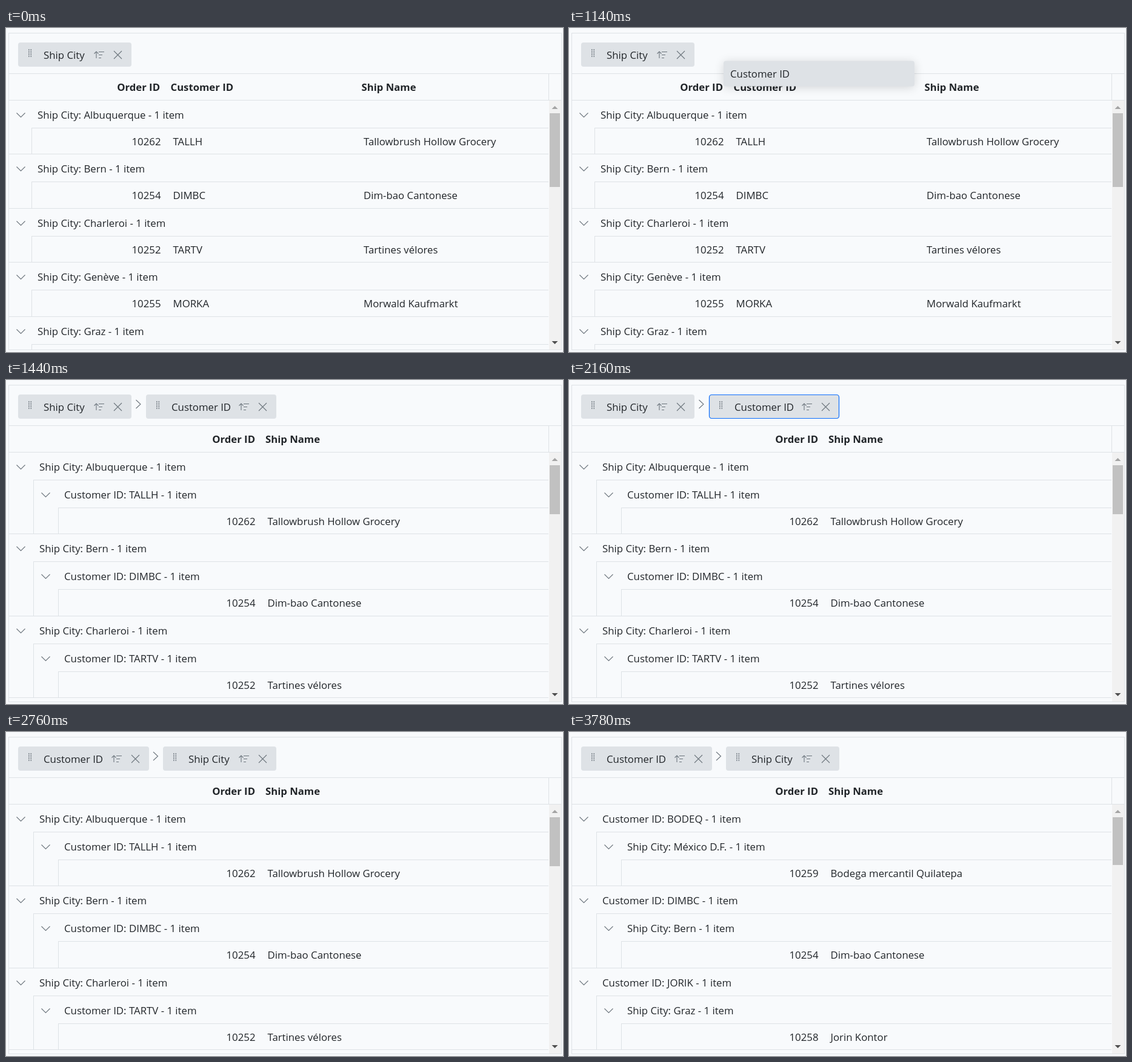
Recreate the animation shown at these times as an HTML page with a canvas. Size 919 by 536 pixels, loop 4200 ms.

```html
<!DOCTYPE html>
<html lang="en">
<head>
<meta charset="utf-8">
<title>Grid grouping</title>
<style>
  html, body { margin: 0; width: 100%; height: 100%; overflow: hidden; background: #f8fafc; }
  canvas { display: block; }
</style>
</head>
<body>
<canvas id="stage" width="919" height="536"></canvas>
<script>
const ctx = document.getElementById('stage').getContext('2d');
const LOOP = 4200, STEP = 60;
const BG = '#f8fafc', LINE = '#dee2e6', CHIP = '#dee2e6', INK = '#212529', ICON = '#6c757d', BLUE = '#0d6efd';
const FACE = '"Open Sans", "Noto Sans", sans-serif';

const order = (id, code, name, city) => ({ id, code, name, city });
const tallow = order('10262', 'TALLH', 'Tallowbrush Hollow Grocery', 'Albuquerque');
const dim = order('10254', 'DIMBC', 'Dim-bao Cantonese', 'Bern');
const tartine = order('10252', 'TARTV', 'Tartines vélores', 'Charleroi');
const morwald = order('10255', 'MORKA', 'Morwald Kaufmarkt', 'Genève');
const jorin = order('10258', 'JORIK', 'Jorin Kontor', 'Graz');
const bodega = order('10259', 'BODEQ', 'Bodega mercantil Quilatepa', 'México D.F.');

const cityLabel = o => `Ship City: ${o.city} - 1 item`;
const codeLabel = o => `Customer ID: ${o.code} - 1 item`;
const ease = p => p * p * (3 - 2 * p);

function text(str, x, y, { align = 'left', bold = false } = {}) {
  ctx.font = `${bold ? '700 16.7' : '400 16.8'}px ${FACE}`;
  ctx.textAlign = align;
  ctx.fillStyle = INK;
  ctx.fillText(str, x, y);
}

function fill(x, y, w, h, color) {
  ctx.fillStyle = color;
  ctx.fillRect(x, y, w, h);
}

const hLine = (x, y, x2 = 895) => fill(x, y, x2 - x, 1, LINE);
const vLine = (x, y, y2) => fill(x, y, 1, y2 - y, LINE);

function stroke(points, color = ICON, width = 1.1) {
  ctx.beginPath();
  points.forEach(([x, y]) => ctx.lineTo(x, y));
  ctx.strokeStyle = color;
  ctx.lineWidth = width;
  ctx.stroke();
}

function roundBox(x, y, w, h, color) {
  ctx.beginPath();
  ctx.roundRect(x, y, w, h, 4);
  ctx.fillStyle = color;
  ctx.fill();
}

const chevronDown = (x, y) => stroke([[x - 7, y - 3.5], [x, y + 3.5], [x + 7, y - 3.5]]);

function triangle(x, y, dir, color) {
  ctx.beginPath();
  ctx.moveTo(x - 5, y + 2.5 * dir);
  ctx.lineTo(x + 5, y + 2.5 * dir);
  ctx.lineTo(x, y - 2.5 * dir);
  ctx.fillStyle = color;
  ctx.fill();
}

function chip(label, x, right, focused) {
  roundBox(x, 24, right - x, 40, CHIP);
  if (focused) {
    ctx.beginPath();
    ctx.roundRect(x + 0.5, 24.5, right - x - 1, 39, 4);
    ctx.strokeStyle = BLUE;
    ctx.lineWidth = 1.2;
    ctx.stroke();
  }
  for (let i = 0; i < 10; i++) fill(x + 17 + (i % 2) * 3.5, 35 + (i >> 1) * 2.8, 1.6, 1.6, ICON);
  text(label, x + 42, 50.5);

  const s = right - 62;
  stroke([[s + 4, 50], [s + 4, 39]]);
  stroke([[s + 0.5, 42.5], [s + 4, 39], [s + 7.5, 42.5]]);
  [9, 6, 4].forEach((w, i) => fill(s + 8, 39 + i * 5, w, 1, ICON));

  const c = right - 22.5;
  stroke([[c - 6.5, 38], [c + 6.5, 51]]);
  stroke([[c + 6.5, 38], [c - 6.5, 51]]);
}

const chipArrow = x => stroke([[x, 33], [x + 7.5, 40], [x, 47]]);

function dragBox(label, x, y, w, h, pad) {
  ctx.save();
  ctx.shadowColor = 'rgba(0,0,0,0.15)';
  ctx.shadowBlur = 16;
  ctx.shadowOffsetY = 2;
  roundBox(x, y, w, h, CHIP);
  ctx.restore();
  text(label, x + pad, y + h / 2 + 6);
}

function frame() {
  fill(0, 0, 919, 536, BG);
  hLine(4, 8, 917);
  hLine(4, 532, 917);
  vLine(4, 8, 533);
  vLine(916, 8, 533);
  hLine(5, 75, 916);
  hLine(5, 119, 916);
  vLine(895, 76, 119);
}

function scrollbar(thumb, color) {
  fill(896, 120, 20, 412, '#f1f1f1');
  fill(897, 141, 17, thumb, color);
  triangle(905.5, 131.5, 1, '#a3a3a3');
  triangle(905.5, 520.5, -1, '#505050');
}

function clipped(draw) {
  ctx.save();
  ctx.beginPath();
  ctx.rect(4, 120, 891, 412);
  ctx.clip();
  draw();
  ctx.restore();
}

function oneLevel() {
  text('Order ID', 254, 104, { align: 'right', bold: true });
  text('Customer ID', 271.5, 104, { bold: true });
  text('Ship Name', 586.5, 104, { bold: true });
  clipped(() => [tallow, dim, tartine, morwald, jorin].forEach((o, i) => {
    const y = Math.floor(119 + i * 89.5), end = Math.floor(119 + (i + 1) * 89.5);
    chevronDown(24.5, y + 25);
    text(cityLabel(o), 52, y + 31);
    hLine(42, y + 46);
    vLine(42, y + 46, end);
    text(o.id, 255.5, y + 75, { align: 'right' });
    text(o.code, 275.5, y + 75);
    text(o.name, 590, y + 75);
    hLine(5, end);
  }));
}

function twoLevels(rows, outer, inner) {
  text('Order ID', 411, 104, { align: 'right', bold: true });
  text('Ship Name', 428, 104, { bold: true });
  clipped(() => rows.forEach((o, i) => {
    const y = Math.floor(119 + i * 135.6), end = Math.floor(119 + (i + 1) * 135.6);
    chevronDown(24.5, y + 25);
    text(outer(o), 55, y + 31);
    hLine(45, y + 46);
    vLine(45, y + 46, end);
    chevronDown(65.5, y + 71);
    text(inner(o), 96, y + 77);
    hLine(86, y + 92);
    vLine(86, y + 92, end);
    text(o.id, 411.5, y + 121, { align: 'right' });
    text(o.name, 431.5, y + 121);
    hLine(5, end);
  }));
}

function spinner(t) {
  const turn = (t - 1380) / 1000 * Math.PI * 4;
  ctx.beginPath();
  ctx.arc(461, 270, 20.3, -1.65 + turn, 3.2 + turn);
  ctx.strokeStyle = BLUE;
  ctx.lineWidth = 4.6;
  ctx.stroke();
}

function chips(t) {
  if (t < 2460) {
    chip('Ship City', 20, 207);
    if (t < 1320) return;
    chipArrow(214.5);
    chip('Customer ID', 231, 446, t >= 2160);
  } else {
    chip('Customer ID', 20, 236);
    chipArrow(243);
    chip('Ship City', 259, 446);
  }
}

function draw(t) {
  frame();
  chips(t);

  if (t < 1440) oneLevel();
  else if (t < 2940) twoLevels([tallow, dim, tartine], cityLabel, codeLabel);
  else twoLevels([bodega, dim, jorin], codeLabel, cityLabel);

  const hover = t >= 3720 && t < 3780;
  scrollbar(t < 1440 ? 122 : t < 2940 ? 81 : 79, hover ? '#a8a8a8' : '#c1c1c1');

  if (t >= 1020 && t < 1320) {
    const e = ease((t - 1020) / 240);
    dragBox('Customer ID', 265 - 20 * e, 73 - 37 * e, 315, 42, 11);
  }
  if (t >= 1320 && t < 1440) spinner(t);
  if (t >= 2340 && t < 2760) {
    const e = ease((t - 2340) / 360);
    dragBox('Customer ID', 228 - 156 * e, 23.5, 219, 44, 9);
  }
}

const start = performance.now();
function tick() {
  const t = (performance.now() - start) % LOOP;
  draw(Math.floor(t / STEP) * STEP);
  requestAnimationFrame(tick);
}
tick();
</script>
</body>
</html>
```
